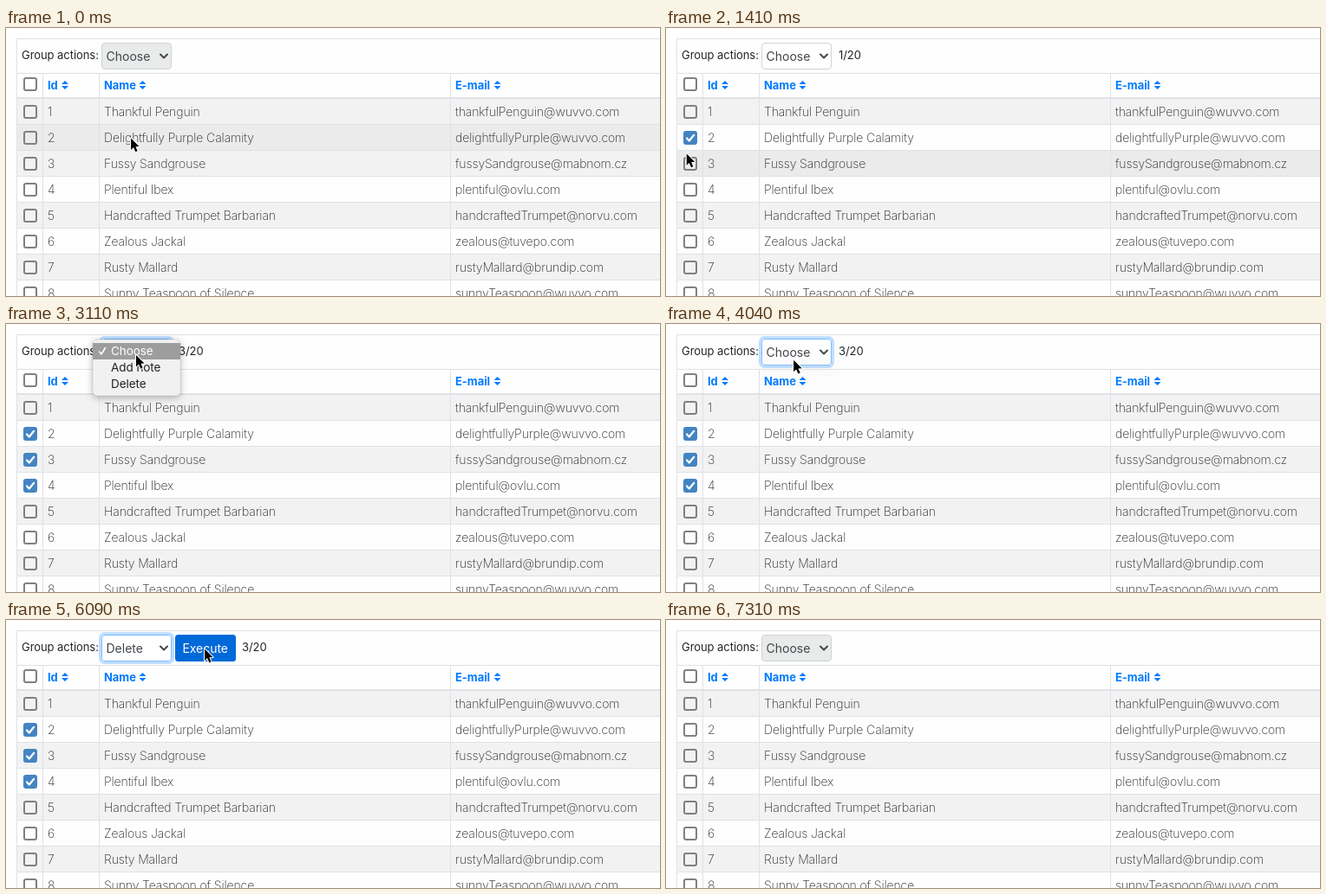
Recreate the animation shown at these times as an HTML page with a canvas. Size 754 by 310 pixels, loop 7.49 s.

```html
<!DOCTYPE html>
<html lang="en">
<head>
<meta charset="utf-8">
<title>Group actions</title>
<style>
  html, body { margin: 0; width: 100%; height: 100%; overflow: hidden; background: #fefefe; }
  canvas { display: block; width: 754px; height: 310px; }
</style>
</head>
<body>
<canvas id="stage"></canvas>
<script>
const W = 754, H = 310, LOOP = 7490;
const canvas = document.getElementById('stage');
const ctx = canvas.getContext('2d');
const ratio = window.devicePixelRatio || 1;
canvas.width = W * ratio;
canvas.height = H * ratio;

const PAPER = '#fefefe', LINE = '#dee2e6', BLUE = '#007bff', INK = '#212529';
const ROW_TOP = 81, ROW_H = 30;

const people = [
  ['Thankful Penguin', 'thankfulPenguin@wuvvo.com'],
  ['Delightfully Purple Calamity', 'delightfullyPurple@wuvvo.com'],
  ['Fussy Sandgrouse', 'fussySandgrouse@mabnom.cz'],
  ['Plentiful Ibex', 'plentiful@ovlu.com'],
  ['Handcrafted Trumpet Barbarian', 'handcraftedTrumpet@norvu.com'],
  ['Zealous Jackal', 'zealous@tuvepo.com'],
  ['Rusty Mallard', 'rustyMallard@brundip.com'],
  ['Sunny Teaspoon of Silence', 'sunnyTeaspoon@wuvvo.com']
];
const options = ['Choose', 'Add note', 'Delete'];

// Moments of the interaction, in ms
const CHECKED_AT = { 1: 1180, 2: 1710, 3: 2230 };
const FOCUS = 2990, NOTE = 4090, REMOVE = 5450, PRESS = 6210, DONE = 6320, GONE = 7310;
const menus = [
  { open: 2990, pick: 3760, end: 4045, selected: 0 },
  { open: 4570, pick: 5160, end: 5440, selected: 1 }
];

// Pointer moves: start, end, target x, target y, vertical lag
const moves = [
  [300, 820, 23, 122, 1],
  [1180, 1530, 24, 154, 1],
  [1710, 2050, 24, 186, 1],
  [2230, 2940, 150, 36, 1.62],
  [3410, 3520, 150, 47, 1],
  [3760, 4270, 145, 38, 1],
  [4800, 4980, 155, 47.5, 1],
  [5620, 6030, 229, 33.5, 1],
  [6860, 7310, 260, 318, 1]
];

const clamp = v => Math.max(0, Math.min(1, v));
const smooth = v => v * v * (3 - 2 * v);

function pointerAt(t) {
  let x = 144, y = 127.5;
  for (const [start, end, tx, ty, lag] of moves) {
    if (t < start) break;
    const k = smooth(clamp((t - start) / (end - start)));
    x += (tx - x) * k;
    y += (ty - y) * k ** lag;
  }
  return { x, y };
}

function text(str, x, y, { size = 13, weight = 400, color = INK, spacing = -0.06 } = {}) {
  ctx.font = `${weight} ${size}px Inter, sans-serif`;
  ctx.letterSpacing = spacing + 'px';
  ctx.fillStyle = color;
  ctx.fillText(str, x, y);
}

function rect(x, y, w, h, color) {
  ctx.fillStyle = color;
  ctx.fillRect(x, y, w, h);
}

function rounded(x, y, w, h, r, fill, stroke, width = 1) {
  ctx.beginPath();
  ctx.roundRect(x, y, w, h, r);
  if (fill) { ctx.fillStyle = fill; ctx.fill(); }
  if (stroke) { ctx.strokeStyle = stroke; ctx.lineWidth = width; ctx.stroke(); }
}

function polygon(points, fill) {
  ctx.beginPath();
  points.forEach(([x, y]) => ctx.lineTo(x, y));
  ctx.closePath();
  ctx.fillStyle = fill;
  ctx.fill();
}

function polyline(points, color, width) {
  ctx.beginPath();
  points.forEach(([x, y]) => ctx.lineTo(x, y));
  ctx.strokeStyle = color;
  ctx.lineWidth = width;
  ctx.lineCap = ctx.lineJoin = 'round';
  ctx.stroke();
}

function checkbox(cy, checked) {
  if (checked) {
    rounded(20, cy - 8, 16, 16, 3, '#4384c2');
    polyline([[24, cy + 0.5], [26.8, cy + 3.5], [32.2, cy - 3.2]], '#fff', 2.2);
  } else {
    rounded(21, cy - 7, 14, 14, 2, null, '#808080', 2);
  }
}

function heading(label, x, iconX) {
  text(label, x, 71, { weight: 700, color: BLUE });
  polygon([[iconX - 4, 65], [iconX, 61], [iconX + 4, 65]], BLUE);
  polygon([[iconX - 4, 67], [iconX, 71], [iconX + 4, 67]], BLUE);
}

function table(t, pointer) {
  const hovered = t < GONE ? Math.floor((pointer.y - ROW_TOP) / ROW_H) : -1;
  people.forEach((person, i) => {
    const top = ROW_TOP + i * ROW_H, base = top + 21;
    rect(13, top, W, ROW_H, i === hovered ? '#ebebeb' : i % 2 ? PAPER : '#f2f2f2');
    if (i) rect(12, top, W, 1, LINE);
    checkbox(top + 16, t >= CHECKED_AT[i] && t < DONE);
    [i + 1, ...person].forEach((cell, c) =>
      text(cell, [48, 113, 518][c], base, { size: 14, weight: 250, spacing: -0.1 }));
  });

  rect(12, 12, W, 1, LINE);
  rect(12, 52, W, 1, LINE);
  rect(12, 80, W, 2, LINE);
  rect(12, 12, 1, H, LINE);
  for (const x of [42, 107, 512]) rect(x, 52, 1, H, LINE);

  checkbox(65, false);
  heading('Id', 48, 68);
  heading('Name', 113, 157.5);
  heading('E-mail', 518, 566.5);
}

// Three pixel glow just outside a control
function focusRing(x, y, w, h) {
  rounded(x - 1.5, y - 1.5, w + 3, h + 3, 5, null, '#bfdeff', 3);
}

function select(label, enabled, focused) {
  if (focused) focusRing(110, 17, 81, 31);
  rounded(110.5, 17.5, 80, 30, 3.5, enabled ? '#fff' : '#e9eaea', focused ? '#80bdff' : '#ced4da');
  text(label, 115.5, 38, { size: 14, color: '#40464c', spacing: 0 });
  polyline([[178, 30.5], [182, 34.5], [186, 30.5]], '#434649', 2);
}

function executeButton(x, hover, pressed) {
  if (pressed) focusRing(x, 17, 70, 31);
  rounded(x, 17, 70, 31, 3.5, pressed ? '#0062cc' : hover ? '#0069d9' : BLUE);
  text('Execute', x + 8.5, 38, { size: 14, color: '#fff' });
}

function toolbar(t, pointer) {
  const enabled = t >= CHECKED_AT[1] && t < DONE;
  const choice = t < NOTE || t >= DONE ? 0 : t < REMOVE ? 1 : 2;
  text('Group actions:', 18, 36);
  select(options[choice], enabled, t >= FOCUS && t < PRESS);
  if (choice === 1) rounded(195.5, 17.5, 164, 30, 3.5, '#fff', '#ced4da');
  if (choice) {
    const x = choice === 1 ? 363 : 195;
    executeButton(x, pointer.x >= x && pointer.x < x + 70, t >= PRESS);
  }
  if (enabled) {
    const count = Object.values(CHECKED_AT).filter(at => t >= at).length;
    text(count + '/20', [199, 440, 272][choice], 36);
  }
}

function menu({ open, pick, end, selected }, t, pointer) {
  if (t < open || t >= end) return;
  const top = 22 - selected * 19;
  const blink = t >= pick && t < pick + 60;
  const active = blink ? -1 : Math.floor((pointer.y - top) / 19);
  ctx.save();
  ctx.globalAlpha = 1 - clamp((t - pick - 110) / (end - pick - 110));
  ctx.shadowColor = 'rgba(0,0,0,.3)';
  ctx.shadowBlur = 9 * ratio;
  ctx.shadowOffsetY = 2 * ratio;
  rounded(100, top - 4, 101, 65, 5, '#f1f1f1');
  ctx.shadowColor = 'transparent';
  rounded(100, top - 4, 101, 65, 5, null, 'rgba(0,0,0,.12)', 0.6);
  options.forEach((label, i) => {
    const y = top + i * 19, color = i === active ? '#fff' : '#222';
    if (i === active) rect(100, y, 101, 19, '#9d9d9d');
    text(label, 121, y + 14, { size: 13.5, color });
    if (i === selected) polyline([[107.5, y + 10], [110, y + 13], [114.5, y + 5.5]], color, 1.5);
  });
  ctx.restore();
}

function arrow({ x, y }) {
  const shape = [[0, 0], [0, 13.4], [3, 10.6], [5.3, 15.8], [7.6, 14.8], [5.4, 9.7], [9.5, 9.5]];
  const points = shape.map(([dx, dy]) => [x + dx, y + dy]);
  polyline([...points, points[0]], '#fff', 2);
  polygon(points, '#000');
}

function draw(t) {
  const pointer = pointerAt(t);
  ctx.setTransform(ratio, 0, 0, ratio, 0, 0);
  rect(0, 0, W, H, PAPER);
  table(t, pointer);
  toolbar(t, pointer);
  menus.forEach(m => menu(m, t, pointer));
  if (t < GONE) arrow(pointer);
}

const began = performance.now();
function tick() {
  draw((performance.now() - began) % LOOP);
  requestAnimationFrame(tick);
}
tick();
</script>
</body>
</html>
```
